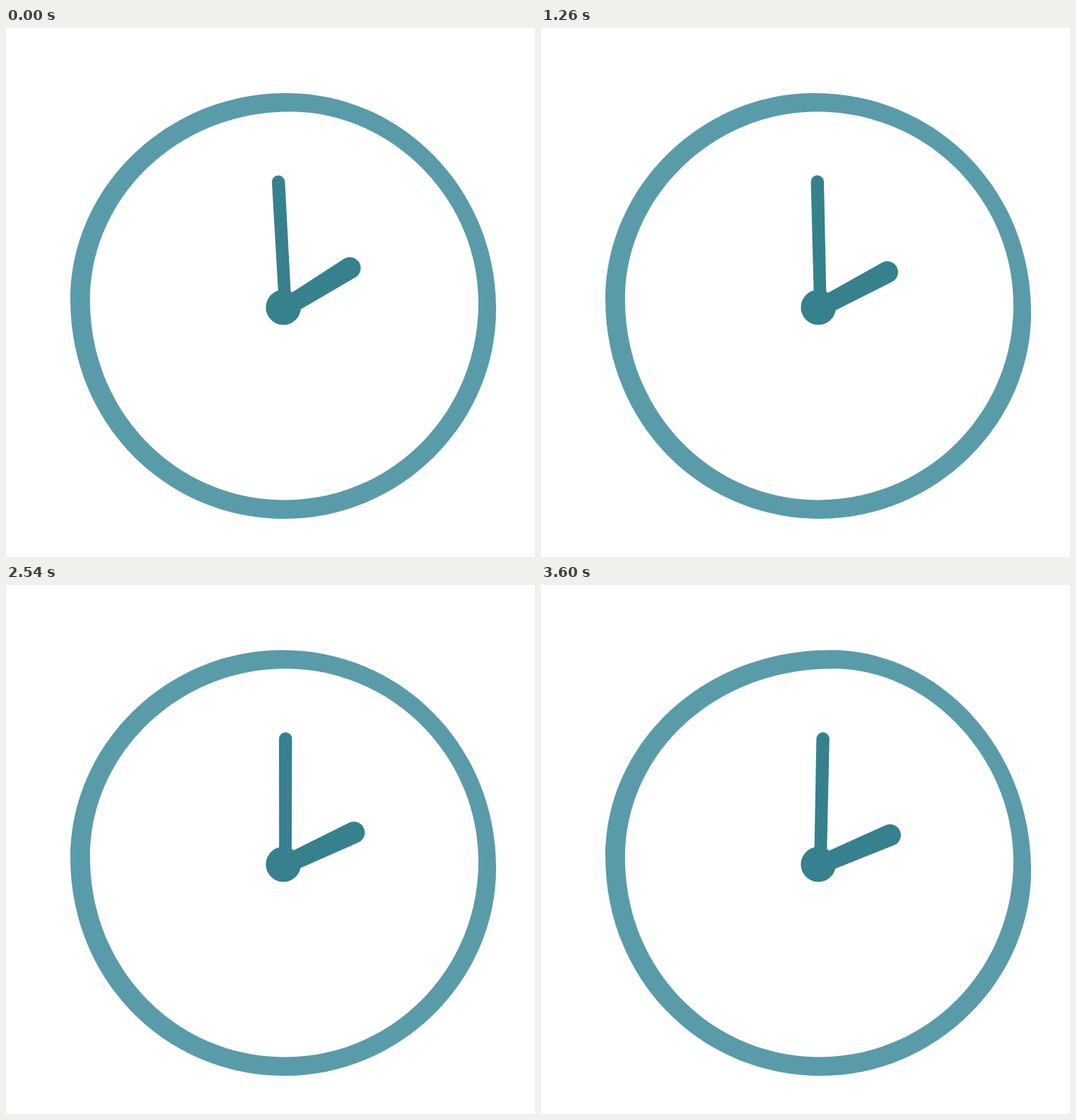
Recreate the animation shown at these times as an HTML page. Size 748 px wide and 748 px high, loop 3.7 s.

```html
<!DOCTYPE html>
<html lang="en">
<head>
<meta charset="utf-8">
<title>Clock</title>
<style>
html, body { margin: 0; width: 100%; height: 100%; overflow: hidden; background: #fff; }
svg { display: block; width: 100vw; height: 100vh; }
</style>
</head>
<body>
<svg viewBox="0 0 748 748">
  <path id="ring" fill="#5a9baa" fill-rule="evenodd"/>
  <g fill="#37808d">
    <path id="minute"/>
    <path id="hour"/>
    <circle cx="392.2" cy="395" r="24.8"/>
  </g>
</svg>
<script>
const LOOP = 3700;
const [ring, minute, hour] = ['ring', 'minute', 'hour'].map(id => document.getElementById(id));

// A new drawing every 100 ms, with an extra 20 ms one before every third beat
const steps = [];
for (let beat = 0, t = 0; t < LOOP; beat++) {
  if (beat > 1 && beat % 3 === 1) {
    steps.push(t);
    t += 20;
  }
  steps.push(t);
  t += 100;
}

// Sideways lean of the ring's top: [time, offset]
const leans = [[0, 5], [840, 12], [1260, -6], [2020, 6], [2540, -1], [3180, -14], [3600, 18]];

function leanAt(t) {
  const i = Math.max(1, leans.findIndex(key => key[0] >= t));
  const [[t0, a], [t1, b]] = [leans[i - 1], leans[i]];
  return a + (b - a) * (t - t0) / (t1 - t0);
}

// Seeded value between -1 and 1
function noise(n) {
  const s = Math.sin(n * 12.9898 + 4.1) * 43758.5453;
  return 2 * (s - Math.floor(s)) - 1;
}

// Circle whose four anchors slide along their tangents while the handles stay put
function wobblyCircle(cx, cy, r, [top, right, bottom, left]) {
  const h = r * 0.5523;
  const n = cy - r, e = cx + r, s = cy + r, w = cx - r;
  return `M${cx + top} ${n}` +
    `C${cx + h} ${n} ${e} ${cy - h} ${e} ${cy + right}` +
    `C${e} ${cy + h} ${cx + h} ${s} ${cx + bottom} ${s}` +
    `C${cx - h} ${s} ${w} ${cy + h} ${w} ${cy + left}` +
    `C${w} ${cy - h} ${cx - h} ${n} ${cx + top} ${n}Z`;
}

// Upright hand with a round tip, a and b being half its width at base and tip
const handPath = (a, b, length) =>
  `M${-a} 0L${-b} ${-length}a${b} ${b} 0 0 1 ${2 * b} 0L${a} 0Z`;

const turn = (hand, angle) =>
  hand.setAttribute('transform', `translate(395 395.5) rotate(${angle})`);

minute.setAttribute('d', handPath(8.8, 9.2, 178));
hour.setAttribute('d', handPath(13, 15.4, 107));

function draw(time) {
  const t = time % LOOP;
  const step = steps.findLastIndex(start => start <= t);
  const start = steps[step];

  const lean = leanAt(start);
  const jitter = (seed, size) => size * noise(step + seed);
  const outer = [lean, 8 + jitter(50, 4), 3 + jitter(100, 4), -8 + jitter(150, 2)];
  const inner = [lean + 3, -2 + jitter(200, 3), -1 + jitter(250, 3), -9 + jitter(300, 2)];
  ring.setAttribute('d',
    wobblyCircle(392, 393, 301, outer) + wobblyCircle(393.4, 392.8, 274.6, inner));

  const ease = (start / 3600) ** 0.83;
  turn(minute, -3.16 + 4.32 * ease);
  turn(hour, 58.4 + 8.6 * ease);
}

let begin;
function tick(now) {
  begin ??= now;
  draw(now - begin);
  requestAnimationFrame(tick);
}
draw(0);
requestAnimationFrame(tick);
</script>
</body>
</html>
```
